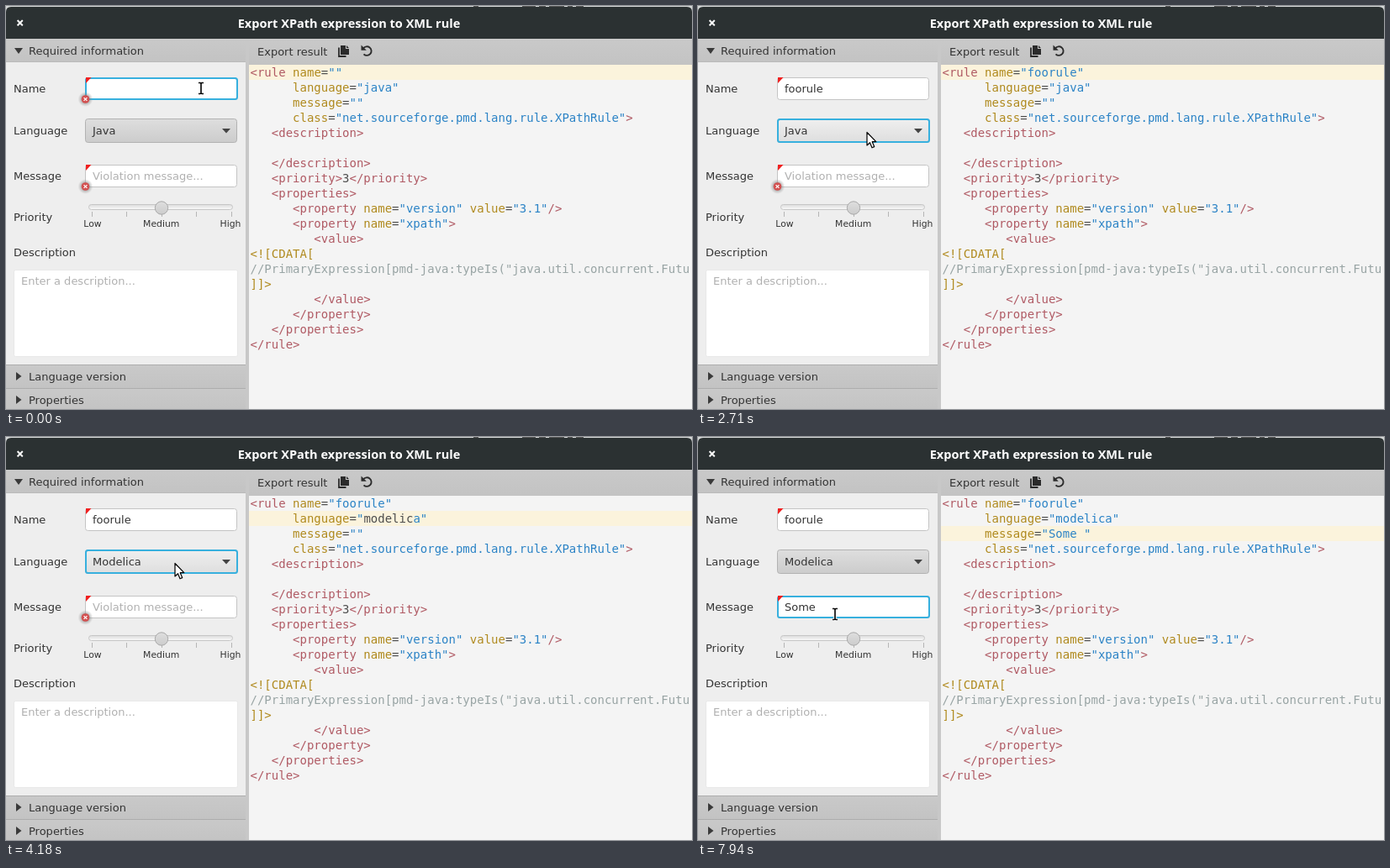
An HTML page for the animation above (8 s loop, 816x480 px).

```html
<!DOCTYPE html>
<html lang="en">
<head>
<meta charset="utf-8">
<title>Export rule dialog</title>
<style>
html, body { margin: 0; width: 100%; height: 100%; overflow: hidden; background: #eee; }
svg { display: block; width: 816px; height: 480px; }
text { font: 13px "DejaVu Sans", sans-serif; fill: #333; white-space: pre; }
.title { font: bold 14.55px "Noto Sans", "Open Sans", sans-serif; fill: #fff; text-anchor: middle; }
.small { font-size: 10.83px; text-anchor: middle; }
.hint { fill: #b0b0b0; }
.code text { font: 14px "DejaVu Sans Mono", monospace; fill: #4d4d4d; }
.code .tag { fill: #b05a64; }
.code .attr { fill: #b08a1e; }
.code .str { fill: #2b83c6; }
.code .note { fill: #98a4a4; }
</style>
</head>
<body>
<svg id="stage" viewBox="0 0 816 480">
  <defs>
    <linearGradient id="bar" x2="0" y2="1"><stop stop-color="#c9c9c9"/><stop offset="1" stop-color="#c3c3c3"/></linearGradient>
    <linearGradient id="button" x2="0" y2="1"><stop stop-color="#dedede"/><stop offset="1" stop-color="#cccccc"/></linearGradient>
    <linearGradient id="buttonHover" x2="0" y2="1"><stop stop-color="#efefef"/><stop offset="1" stop-color="#dedede"/></linearGradient>
    <linearGradient id="track" x2="0" y2="1"><stop stop-color="#dcdcdc"/><stop offset="1" stop-color="#fafafa"/></linearGradient>
    <radialGradient id="glow"><stop offset=".45" stop-color="#777" stop-opacity=".6"/><stop offset="1" stop-color="#999" stop-opacity="0"/></radialGradient>
    <filter id="shadow" x="-20%" y="-10%" width="140%" height="120%"><feDropShadow dx="0" dy="3" stdDeviation="4" flood-opacity=".4"/></filter>
  </defs>
</svg>
<script>
const LOOP = 8000;
const COL = 8.428;
const ROW = 26;
const NS = "http://www.w3.org/2000/svg";
const stage = document.getElementById("stage");

function add(parent, tag, attrs = {}, text) {
  const node = document.createElementNS(NS, tag);
  for (const key in attrs) node.setAttribute(key, attrs[key]);
  if (text !== undefined) node.textContent = text;
  parent.appendChild(node);
  return node;
}
const group = (parent = stage) => add(parent, "g");
const rect = (p, x, y, width, height, fill, more = {}) =>
  add(p, "rect", { x, y, width, height, fill, ...more });
const path = (p, d, fill, more = {}) => add(p, "path", { d, fill, ...more });
const label = (p, x, y, text, cls = "") => add(p, "text", { x, y, class: cls }, text);
const show = (node, on) => node.setAttribute("display", on ? "inline" : "none");
function setText(node, text) {
  if (node.textContent !== text) node.textContent = text;
}

function drawWindow() {
  rect(stage, 0, 0, 816, 480, "#eee");
  rect(stage, 0, 0, 816, 8, "#d5d8d8");
  for (const [x, w] of [[556, 6], [614, 16], [634, 8], [646, 18], [668, 6], [678, 9]])
    rect(stage, x, 0, w, 1, "#555");
  path(stage, "M0 39V7Q0 1 6 1H810Q816 1 816 7V39Z", "#2b3132");
  label(stage, 408, 26, "Export XPath expression to XML rule", "title");
  path(stage, "M13.6 17L19.8 23.2M19.8 17L13.6 23.2", "none", { stroke: "#fff", "stroke-width": 2 });

  rect(stage, 0, 39, 285, 28, "url(#bar)");
  rect(stage, 0, 66, 285, 1, "#bababa");
  path(stage, "M10 50H20L15 57Z", "#3a3a3a");
  label(stage, 27, 58, "Required information");
  [["Language version", 428], ["Properties", 456]].forEach(([name, y]) => {
    rect(stage, 0, y, 285, 27, "url(#bar)");
    rect(stage, 0, y - 1, 285, 1, "#adadad");
    path(stage, `M12 ${y + 8}V${y + 18}L18.5 ${y + 13}Z`, "#3a3a3a");
    label(stage, 27, y + 18, name);
  });

  rect(stage, 289, 70, 527, 410, "#f4f4f4");
  rect(stage, 285, 39, 531, 31, "url(#bar)");
  rect(stage, 285, 39, 4, 441, "#c8c8c8");
  label(stage, 299, 59, "Export result");
  path(stage, "M398 47H404V51H408V58H398Z M405 47L408 50H405Z", "#2b2b2b");
  path(stage, "M396 49.5V60H404.5", "none", { stroke: "#2b2b2b", "stroke-width": 1.8 });
  path(stage, "M425 50.5A5.3 5.3 0 1 1 425.5 57.3", "none", { stroke: "#2b2b2b", "stroke-width": 1.9 });
  path(stage, "M422.5 46.5V52.8H428.8Z", "#2b2b2b");
}

function drawForm() {
  [["Name", 103], ["Language", 153], ["Message", 207], ["Priority", 256], ["Description", 298]]
    .forEach(([name, y]) => label(stage, 9, y, name));

  rect(stage, 98.5, 236.5, 171, 6, "url(#track)", { rx: 3, stroke: "#c6c6c6" });
  for (let i = 0; i < 5; i++) rect(stage, Math.round(102 + i * 41.4), 245, 1, 6, "#b5b5b5");
  add(stage, "circle", { cx: 185, cy: 240.5, r: 7.7, fill: "url(#button)", stroke: "#a9a9a9" });
  [["Low", 103], ["Medium", 184.7], ["High", 267]].forEach(([name, x]) => label(stage, x, 263, name, "small"));

  rect(stage, 9.5, 314.5, 266, 103, "#fff", { rx: 2, stroke: "#e8e8e8" });
  label(stage, 18, 332, "Enter a description...", "hint");
}

function focusRing(parent, y, h) {
  return rect(parent, 95, y + 1, 180, h - 2, "none", { rx: 2.5, stroke: "#37b0de", "stroke-width": 2 });
}

function makeField(y) {
  const g = group();
  rect(g, 94.5, y + .5, 180, 26, "#fff", { rx: 3, stroke: "#c4c4c4" });
  const ring = focusRing(g, y, 27);
  path(g, `M95 ${y}H101.5L95 ${y + 7}Z`, "#f02020");
  const text = label(g, 103, y + 18, "");
  const caret = rect(g, 103, y + 6, 1, 15, "#222");
  const error = group(g);
  const cy = y + 26;
  add(error, "circle", { cx: 94.5, cy, r: 9, fill: "url(#glow)" });
  add(error, "circle", { cx: 94.5, cy, r: 4.8, fill: "#d35050" });
  path(error, `M92.6 ${cy - 1.9}l3.8 3.8m0 -3.8l-3.8 3.8`, "none", { stroke: "#fff", "stroke-width": 1.3 });
  return { ring, text, caret, error };
}

function updateField(field, value, hint, focused, caretOn) {
  const empty = value === "";
  setText(field.text, empty && !focused ? hint : value);
  field.text.setAttribute("class", empty && !focused ? "hint" : "");
  show(field.ring, focused);
  show(field.error, empty);
  show(field.caret, focused && caretOn);
  if (focused) field.caret.setAttribute("x", 103 + (empty ? 0 : field.text.getComputedTextLength()));
}

function makeCombo() {
  const g = group();
  const box = rect(g, 94.5, 134.5, 180, 28, "url(#button)", { rx: 3, stroke: "#b2b2b2" });
  const ring = focusRing(g, 134, 29);
  path(g, "M257 146H267L262 151.5Z", "#444");
  return { box, ring, text: label(g, 103, 153, "Java") };
}

const LANGUAGES = ["Plain text", "Apex", "Ecmascript", "Java", "JSP", "Modelica", "PLSQL", "Maven POM",
  "Scala", "Swift", "VisualForce", "VM", "WSDL", "XML", "XSL"];
const JAVA = 3;

function makePopup() {
  const g = group();
  rect(g, 97, 54, 115, 398, "#fff", { filter: "url(#shadow)" });
  rect(g, 96.5, 53.5, 116, 399, "none", { stroke: "#b4b4b4" });
  const rowY = i => 58 + i * ROW;
  rect(g, 98, rowY(JAVA), 113, ROW, "#97abe8");
  const bar = rect(g, 98, 0, 113, ROW, "#97abe8");
  const items = LANGUAGES.map((name, i) => label(g, 121, rowY(i) + 18, name));
  const check = path(g, "M105.5 149.5L108.5 153.5L114 144.5", "none", { stroke: "#333", "stroke-width": 1.5 });
  return {
    g,
    hover(index) {
      bar.setAttribute("y", rowY(index));
      items.forEach((item, i) => { item.style.fill = i === index ? "#fff" : "#333"; });
      check.setAttribute("stroke", index === JAVA ? "#fff" : "#333");
    }
  };
}

function codeLines(name, language, message) {
  return [
    `<rule name="${name}"`,
    `      language="${language}"`,
    `      message="${message}"`,
    '      class="net.sourceforge.pmd.lang.rule.XPathRule">',
    "   <description>",
    "",
    "   </description>",
    "   <priority>3</priority>",
    "   <properties>",
    '      <property name="version" value="3.1"/>',
    '      <property name="xpath">',
    "         <value>",
    "<![CDATA[",
    '//PrimaryExpression[pmd-java:typeIs("java.util.concurrent.Futu',
    "]]>",
    "         </value>",
    "      </property>",
    "   </properties>",
    "</rule>"
  ];
}

// Wraps the newly inserted part in ~ so that it stays uncoloured until restyled.
function markFresh(text, styled) {
  if (text === styled) return text;
  let from = 0, tail = 0;
  while (from < styled.length && text[from] === styled[from]) from++;
  while (tail < styled.length - from && text.at(-1 - tail) === styled.at(-1 - tail)) tail++;
  const to = text.length - tail;
  return `${text.slice(0, from)}~${text.slice(from, to)}~${text.slice(to)}`;
}

const TOKEN = /(?<note>^\/\/.*)|(?<attr><!\[CDATA\[|\]\]>|\w+(?==))|(?<tag><\/?\w+|\/?>)|(?<str>"[^"]*")|[\s\S]/g;

function makeCode() {
  const g = group();
  g.setAttribute("class", "code");
  const mark = rect(g, 289, 70, 527, 18, "#fbf3dc");
  const rows = codeLines("", "", "").map((_, i) => label(g, 290.5, 84 + 18 * i, ""));
  const shown = [];
  return (lines, active) => {
    mark.setAttribute("y", 70 + 18 * active);
    lines.forEach((line, i) => {
      if (shown[i] === line) return;
      shown[i] = line;
      const body = line.trimStart();
      rows[i].textContent = "";
      rows[i].setAttribute("x", 290.5 + (line.length - body.length) * COL);
      for (const token of body.matchAll(TOKEN)) {
        const cls = Object.keys(token.groups).find(key => token.groups[key]) || "";
        token[0].split("~").forEach((part, k) => add(rows[i], "tspan", { class: k % 2 ? "" : cls }, part));
      }
    });
  };
}

function makePointer() {
  const g = group();
  const arrow = path(g, "M1 .5V16L4.5 12.7L7 18.8L9.7 17.6L7.2 11.7H11.8Z", "#fff",
    { stroke: "#000", "stroke-width": 1.2, "stroke-linejoin": "round" });
  const beam = group(g);
  const bars = "M-3 -6.5H-1Q0 -6.5 0 -5.5Q0 -6.5 1 -6.5H3M0 -6V6M-3 6.5H-1Q0 6.5 0 5.5Q0 6.5 1 6.5H3";
  path(beam, bars, "none", { stroke: "#fff", "stroke-width": 3.4 });
  path(beam, bars, "none", { stroke: "#000", "stroke-width": 1.6 });
  return { g, arrow, beam };
}

// Timeline: each entry holds from its time until the next one.
const POINTER = [
  [0, 232, 98], [60, 230, 99], [180, 229, 100],
  [1650, 222, 118], [1710, 214, 138], [1770, 203, 155], [1880, 196, 162],
  [2060, 197, 160], [2120, 199, 154], [2180, 200, 150],
  [3350, 203, 163], [3410, 206, 182], [3470, 210, 202], [3530, 213, 220],
  [3880, 209, 200], [3940, 205, 178], [4180, 200, 150],
  [4710, 196, 160], [4770, 186, 178], [4830, 172, 200], [4940, 163, 211]
];
const HOVER = [[0, 3], [3180, 4], [3410, 5], [3470, 6], [3880, 5]];
const NAME_KEYS = [530, 650, 710, 820, 880, 1000, 1060];
const MESSAGE_KEYS = [6880, 7060, 7180, 7290, 7410];
const PICK = 4180;
const TYPE_LAG = 60;
const PICK_LAG = 110;

const at = (track, t) => track.findLast(entry => entry[0] <= t);
const typed = (text, keys, t) => text.slice(0, keys.filter(key => key <= t).length);
const within = (t, from, to) => t >= from && t < to;

const nameAt = t => typed("foorule", NAME_KEYS, t);
const messageAt = t => typed("Some ", MESSAGE_KEYS, t);
const languageAt = t => t >= PICK ? "Modelica" : "Java";
const codeLanguage = t => languageAt(t).toLowerCase();
const coloured = (value, t, lag) => markFresh(value(t), value(t - lag));

drawWindow();
drawForm();
const nameField = makeField(85);
const messageField = makeField(189);
const combo = makeCombo();
const updateCode = makeCode();
const popup = makePopup();
const pointer = makePointer();

function render(t) {
  updateField(nameField, nameAt(t), "Name...", t < 2590, within(t, 60, 1590) || t >= 2060);
  updateField(messageField, messageAt(t), "Violation message...", t >= 5530,
    within(t, 5590, 6120) || within(t, 6590, 7940));

  setText(combo.text, languageAt(t));
  show(combo.ring, within(t, 2590, 5530));
  combo.box.setAttribute("fill", within(t, 1710, 4770) ? "url(#buttonHover)" : "url(#button)");

  show(popup.g, within(t, 2820, PICK));
  popup.hover(at(HOVER, t)[1]);

  const lines = codeLines(
    coloured(nameAt, t, TYPE_LAG),
    coloured(codeLanguage, t, PICK_LAG),
    coloured(messageAt, t, TYPE_LAG));
  updateCode(lines, messageAt(t) ? 2 : t >= PICK ? 1 : 0);

  const [, x, y] = at(POINTER, t);
  const overField = y < 113 || (t > 4700 && y > 188);
  pointer.g.setAttribute("transform", `translate(${x} ${y})`);
  show(pointer.arrow, !overField);
  show(pointer.beam, overField);
}

const start = performance.now();
function tick() {
  render((performance.now() - start) % LOOP);
  requestAnimationFrame(tick);
}
tick();
</script>
</body>
</html>
```
